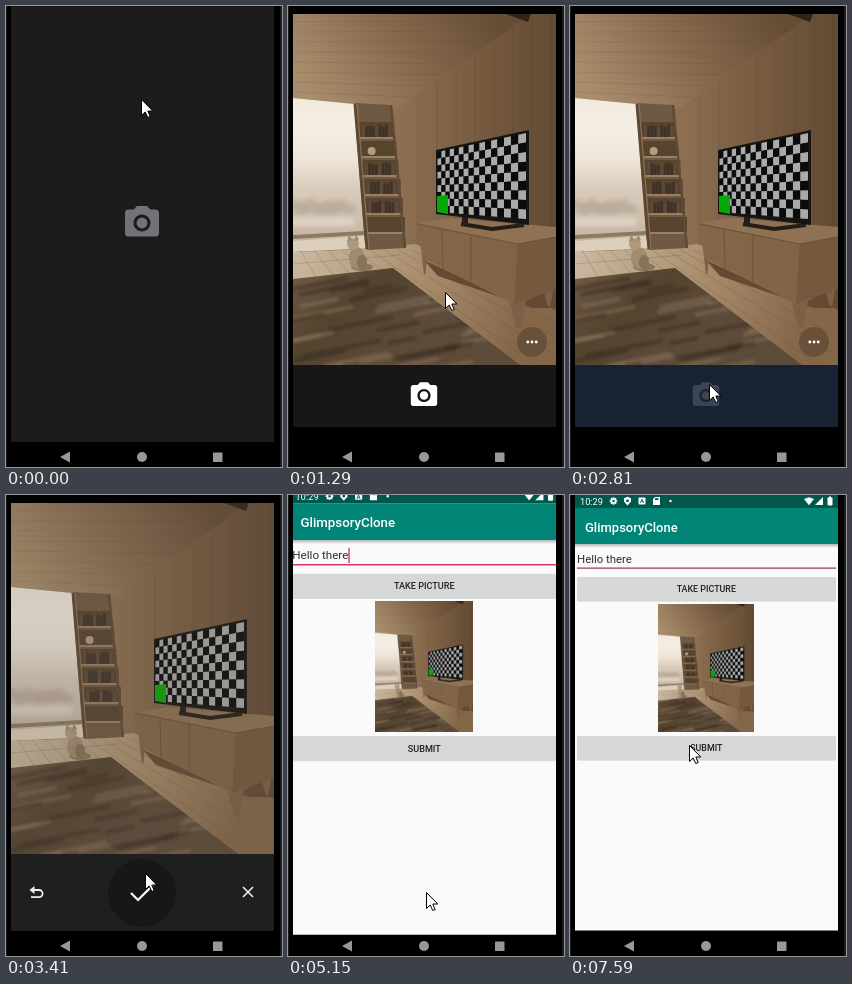
Write an HTML page with a canvas that moves like this. It is 276x461 px and loops after 8 s.

```html
<!DOCTYPE html>
<html lang="en">
<head>
<meta charset="utf-8">
<title>Take a picture</title>
<style>
html, body { margin: 0; width: 100%; height: 100%; overflow: hidden; background: #000; }
canvas { display: block; width: 276px; height: 461px; }
</style>
</head>
<body>
<canvas id="stage"></canvas>
<script>
const W = 276, H = 461, LOOP = 8000;
const VIEW = [5, 8, 263, 351];
const canvas = document.getElementById('stage');
const ctx = canvas.getContext('2d');
const dpr = window.devicePixelRatio || 1;
canvas.width = W * dpr;
canvas.height = H * dpr;

const CAMERA = new Path2D('M9 2L7.17 4H4c-1.1 0-2 .9-2 2v12c0 1.1.9 2 2 2h16c1.1 0 2-.9 2-2V6c0-1.1-.9-2-2-2h-3.17L15 2H9zm3 15c-2.76 0-5-2.24-5-5s2.24-5 5-5 5 2.24 5 5-2.24 5-5 5z');
const POINTER = new Path2D('M.5 .5V16.5L4.2 13L6.8 18.5L9.2 17.5L6.8 12H11.8Z');

// Pointer strokes: first step, last step, bend, end
const STEP = 130;
const STROKES = [
  { from: 900, to: 1290, bend: [216, 230], end: [157, 286] },
  { from: 1420, to: 1840, bend: [112, 302], end: [126, 289] },
  { from: 1990, to: 2400, bend: [126, 330], end: [139, 378] },
  { from: 4000, to: 4420, bend: [120, 387], end: [138, 397] },
  { from: 5900, to: 5900, bend: [126, 340], end: [115, 295] },
  { from: 6030, to: 6430, bend: [108, 262], end: [119, 250] }
];

const within = (t, a, b) => t >= a && t < b;
const mix = (a, b, k) => a + (b - a) * k;

function seeded(seed) {
  return () => (seed = seed * 16807 % 2147483647) / 2147483647;
}

function rect(color, x, y, w, h, r = 0) {
  ctx.fillStyle = color;
  ctx.beginPath();
  ctx.roundRect(x, y, w, h, r);
  ctx.fill();
}

function disc(color, x, y, rx, ry = rx) {
  ctx.fillStyle = color;
  ctx.beginPath();
  ctx.ellipse(x, y, rx, ry, 0, 0, Math.PI * 2);
  ctx.fill();
}

function trace(pts) {
  ctx.beginPath();
  for (let i = 0; i < pts.length; i += 2) ctx.lineTo(pts[i], pts[i + 1]);
}

function poly(color, ...pts) {
  ctx.fillStyle = color;
  trace(pts);
  ctx.closePath();
  ctx.fill();
}

function line(color, width, ...pts) {
  ctx.strokeStyle = color;
  ctx.lineWidth = width;
  trace(pts);
  ctx.stroke();
}

function ramp(x0, y0, x1, y1, ...colors) {
  const g = ctx.createLinearGradient(x0, y0, x1, y1);
  colors.forEach((c, i) => g.addColorStop(i / (colors.length - 1), c));
  return g;
}

function text(str, x, y, size, color, weight = 400, align = 'left') {
  ctx.font = `${weight} ${size}px Roboto, "Noto Sans", sans-serif`;
  ctx.textAlign = align;
  ctx.fillStyle = color;
  ctx.fillText(str, x, y);
}

function layer(draw) {
  ctx.save();
  draw();
  ctx.restore();
}

function clip(x, y, w, h) {
  ctx.beginPath();
  ctx.rect(x, y, w, h);
  ctx.clip();
}

function camera(x, y, scale, color) {
  layer(() => {
    ctx.translate(x, y);
    ctx.scale(scale, scale);
    ctx.translate(-12, -12);
    ctx.fillStyle = color;
    ctx.fill(CAMERA);
    disc(color, 12, 12, 3.2);
  });
}

function walls() {
  rect(ramp(110, 0, 268, 0, '#8d7052', '#785c41', '#624a34'), ...VIEW);
  poly(ramp(30, 105, 200, -5, '#a98e6d', '#866b50', '#664c34'), 5, 8, 243, 8, 110, 102, 66, 98, 5, 92);
  for (let i = 0; i < 8; i++) {
    line('rgba(60,40,24,.1)', 1, 5, 16 + i * 10, 236 - i * 16, 14 + i * 11);
    line('rgba(50,33,20,.1)', 1, 130 + i * 19, 88 - i * 13, 130 + i * 19, 245);
  }
  poly('#30231a', 218, 8, 243, 8, 240, 16);
}

function outside(rand) {
  poly(ramp(0, 92, 0, 245, '#f3eadd', '#f5eee4', '#efe5d8', '#d9cbbb', '#cdbfae', '#bfae99'), 5, 92, 66, 98, 77, 243, 5, 245);
  layer(() => {
    ctx.filter = `blur(${2 * dpr}px)`;
    for (let i = 0; i < 8; i++) disc('rgba(165,148,130,.4)', 6 + i * 8, 199 + rand() * 5, 6, 5 + rand() * 3);
    rect('#ddd1c3', 2, 211, 64, 9);
  });
  poly('#8e7a63', 5, 229, 76, 225, 76, 229, 5, 233);
  poly('#dccfbc', 5, 235, 76, 230, 78, 242, 5, 246);
}

function shelf(rand) {
  poly('#6f5942', 67, 97, 103, 99, 118, 242, 79, 244);
  for (let i = 0; i < 6; i++) {
    const y = 131 + i * 19, x = mix(71, 79, i / 5), w = mix(35, 38, i / 5);
    rect('#57442f', x, y - 15, w, 15);
    if (i === 1) disc('#b59d80', x + 11, y - 5, 4);
    else if (i < 5) for (let k = 0; k < 9; k++) {
      const h = 10 + rand() * 3;
      rect(k % 4 ? '#3f3329' : '#5f4a38', x + 3 + k * 3.3, y - h, 2.8, h);
    }
    rect('#9a7f60', x - 1, y, w + 1, 2);
  }
  line('#5c4733', 3, 67, 98, 79, 243);
  line('#8a7055', 1.2, 69, 98, 81, 243);
  line('#604935', 2.5, 103, 99, 117, 242);
}

function floor() {
  poly(ramp(5, 245, 230, 335, '#cabaa2', '#ab9070', '#846749'), 5, 246, 80, 243, 128, 238, 268, 304, 268, 359, 5, 359);
  for (let i = 0; i < 9; i++) line('rgba(92,69,47,.28)', .8, 12 + i * 14, 244, 80 + i * 34, 359);
  line('rgba(92,69,47,.28)', .8, 5, 258, 112, 249);
}

function rug(rand) {
  layer(() => {
    trace([5, 273, 105, 262, 232, 359, 5, 359]);
    ctx.clip();
    rect(ramp(5, 262, 90, 359, '#715d48', '#54432f', '#5d4b39'), 5, 260, 230, 100);
    ctx.filter = `blur(${1.5 * dpr}px)`;
    for (let i = 0; i < 34; i++) {
      const x = rand() * 190 - 10, y = 272 + i * 2.6, w = 25 + rand() * 55;
      const light = Math.sin(i * .55) < 0;
      line(light ? 'rgba(150,130,105,.4)' : 'rgba(50,38,28,.45)', 4, x, y + w * .2, x + w, y);
    }
  });
}

function cabinet() {
  poly('#644a33', 136, 254, 230, 298, 268, 282, 268, 302, 244, 302, 150, 270);
  const leg = (x, y, w, h) => poly('#7c6047', x, y, x + w, y - 2, x + w * .7, y + h, x + w * .4, y + h);
  leg(134, 252, 5, 16);
  leg(222, 297, 16, 25);
  leg(256, 286, 9, 14);
  poly('#8f7253', 129, 217, 162, 212, 268, 221, 268, 231, 230, 238);
  poly(ramp(130, 0, 230, 0, '#846749', '#7f6448'), 130, 218, 230, 238, 226, 298, 134, 252);
  poly('#74593f', 230, 238, 268, 231, 268, 283, 226, 298);
  line('#674d36', .8, 129, 218, 230, 238, 268, 231);
  for (const k of [.24, .53]) line('#674d36', .8, 130 + 100 * k, 218 + 20 * k, 132 + 96 * k, 252 + 46 * k);
}

function tv() {
  line('#241e19', 4, 173, 218, 204, 223, 236, 219);
  rect('#241e19', 174, 209, 6, 9);
  poly('#171513', 148, 144, 241, 124, 241, 219, 148, 208);
  const cols = 16, rows = 9, left = 60, right = 86;
  const at = (c, r) => {
    const u = c / cols, k = u * left / mix(right, left, u);
    return [149.5 + 88.5 * k, 146 - 19 * k + r / rows * mix(left, right, k)];
  };
  for (let c = 0; c < cols; c++) {
    for (let r = 0; r < rows; r++) {
      poly((c + r) % 2 ? '#aaaaa8' : '#0a0b0c', ...at(c, r), ...at(c + 1, r), ...at(c + 1, r + 1), ...at(c, r + 1));
    }
  }
  poly('#06a808', 149, 190, 160, 189, 160, 208, 149, 206);
}

function cat() {
  disc('rgba(95,75,55,.5)', 74, 261, 11, 4);
  disc('#a08b70', 69, 252, 8, 11);
  disc('#b09a7f', 65, 238, 6);
  for (const x of [59, 66]) poly('#a08b70', x, 236, x + 2, 228, x + 5, 234);
  disc('#87725a', 74, 256, 5, 7);
}

function room() {
  const rand = seeded(17);
  clip(...VIEW);
  walls();
  outside(rand);
  floor();
  shelf(rand);
  rug(rand);
  cabinet();
  tv();
  cat();
}

// The room never changes, so it is painted once and kept.
function paintScene() {
  const kept = document.createElement('canvas');
  const [x, y, w, h] = VIEW.map(v => v * dpr);
  kept.width = w;
  kept.height = h;
  ctx.setTransform(dpr, 0, 0, dpr, 0, 0);
  layer(room);
  kept.getContext('2d').drawImage(canvas, x, y, w, h, 0, 0, w, h);
  return kept;
}

function emptyView() {
  rect('#1c1c1c', 5, 0, 263, 436);
  camera(136, 217, 1.7, '#737377');
}

function preview(t) {
  ctx.drawImage(scene, ...VIEW);
  disc('rgba(66,50,36,.4)', 244, 336, 15);
  for (let i = -1; i < 2; i++) disc('#fff', 244 + i * 4.2, 336, 1.4);
  const busy = t >= 2540;
  rect(busy ? '#172333' : '#171717', 5, 359, 263, 62);
  camera(136, 389.5, 1.32, busy ? '#3c4451' : '#fff');
}

function review() {
  ctx.drawImage(scene, ...VIEW);
  rect('rgba(92,82,70,.2)', ...VIEW);
  rect('#1f1f1f', 5, 359, 263, 77);
  disc('#171717', 136, 398, 34);
  line('#fff', 2.2, 125, 398, 132, 405, 147, 390);
  line('#eee', 1.6, 237, 392, 247, 402);
  line('#eee', 1.6, 247, 392, 237, 402);
  poly('#eee', 23.5, 395, 28.5, 391, 28.5, 399);
  ctx.strokeStyle = '#eee';
  ctx.lineWidth = 1.8;
  ctx.beginPath();
  ctx.moveTo(27, 395);
  ctx.arc(33, 398.6, 3.6, -Math.PI / 2, Math.PI / 2);
  ctx.lineTo(25, 402.2);
  ctx.stroke();
}

function statusBar() {
  const bar = '#00574b';
  rect(bar, 5, 0, 263, 13);
  text('10:29', 10, 9.6, 9.2, '#fff');
  for (let i = 0; i < 4; i++) {
    const a = i * Math.PI / 4, x = 3.8 * Math.cos(a), y = 3.8 * Math.sin(a);
    line('#fff', 1.6, 43.5 - x, 6 - y, 43.5 + x, 6 + y);
  }
  disc('#fff', 43.5, 6, 2.8);
  disc(bar, 43.5, 6, 1.2);
  poly('#fff', 57.5, 1.8, 61, 3.2, 61, 6.5, 57.5, 10.5, 54, 6.5, 54, 3.2);
  disc(bar, 57.5, 5.8, 1.4);
  rect('#fff', 68.5, 2.5, 7, 7, 1);
  text('A', 72, 8.3, 6, bar, 700, 'center');
  poly('#fff', 85, 2, 90, 2, 90, 10, 83, 10, 83, 4);
  rect(bar, 85, 3.2, 3.5, 1.8);
  disc('#fff', 100.5, 6, 1.2);
  poly('#fff', 234, 4, 239, 2.2, 244, 4, 239, 10.2);
  poly('#fff', 253, 2, 253, 10, 245, 10);
  rect('#fff', 257.5, 2.4, 5, 8, .8);
  rect('#fff', 259, 1.4, 2, 1.5);
}

function button(label, y, color = '#d6d7d7') {
  rect('rgba(0,0,0,.12)', 7, y + .7, 259, 24, 1.5);
  rect(color, 7, y, 259, 24, 1.5);
  text(label, 136.3, y + 15.2, 8.9, '#222', 500, 'center');
}

function form(t) {
  const opening = t < 5600;
  const steps = Math.floor((t - 5150) / 150);
  const scale = opening ? 1 + .021 * .4 ** steps : 1;
  const caret = t < 5900 || within(t, 6430, 6830) || within(t, 7000, 7590);
  const pressed = within(t, 6830, 7000);
  clip(5, 0, 263, 440);
  ctx.translate(136.5, 236);
  ctx.scale(scale, scale);
  ctx.translate(-136.5, -236);
  rect('#fafafa', 5, 0, 263, 435.5);
  rect(ramp(0, 49, 0, 53, 'rgba(0,0,0,.28)', 'rgba(0,0,0,0)'), 5, 49, 263, 4);
  rect('#008577', 5, 13, 263, 36);
  statusBar();
  text('GlimpsoryClone', 15, 36.6, 13, '#fff', 500);
  text('Hello there', 7, 68, 11.4, '#303030');
  if (caret) rect('#d81b60', 62, 56.5, 1.2, 15);
  rect(opening ? '#d2386c' : '#9b3c58', 7, 72.4, 259, 1.4);
  button('TAKE PICTURE', 82);
  ctx.imageSmoothingQuality = 'high';
  ctx.drawImage(scene, 88, 109, 96, 128);
  button('SUBMIT', 241, pressed ? '#c3c4c4' : undefined);
}

function phone() {
  rect('#000', 0, 0, W, H);
  rect('#1c1c1c', 0, 0, 1, H);
  rect('#1c1c1c', 274, 0, 2, H);
  poly('#989898', 54, 451, 64, 445.5, 64, 456.5);
  disc('#989898', 136, 451, 5);
  rect('#989898', 207, 446.5, 9.5, 9.5, .6);
}

function pointerAt(t) {
  let pos = [135, 93];
  for (const { from, to, bend, end } of STROKES) {
    if (t < from) break;
    const n = Math.round((to - from) / STEP) + 1;
    const k = Math.min(n, Math.floor((t - from) / STEP) + 1) / n;
    pos = pos.map((p, i) => mix(mix(p, bend[i], k), mix(bend[i], end[i], k), k));
  }
  return pos;
}

function pointer(t) {
  layer(() => {
    ctx.translate(...pointerAt(t).map(Math.round));
    ctx.fillStyle = '#fff';
    ctx.strokeStyle = '#000';
    ctx.lineWidth = 1;
    ctx.fill(POINTER);
    ctx.stroke(POINTER);
  });
}

function draw(t) {
  ctx.setTransform(dpr, 0, 0, dpr, 0, 0);
  phone();
  if (t < 320) emptyView();
  else if (t < 3260) preview(t);
  else if (t < 5150) review();
  else layer(() => form(t));
  pointer(t);
}

const scene = paintScene();
let start;
function tick(now) {
  start ??= now;
  draw((now - start) % LOOP);
  requestAnimationFrame(tick);
}
draw(0);
requestAnimationFrame(tick);
</script>
</body>
</html>
```
